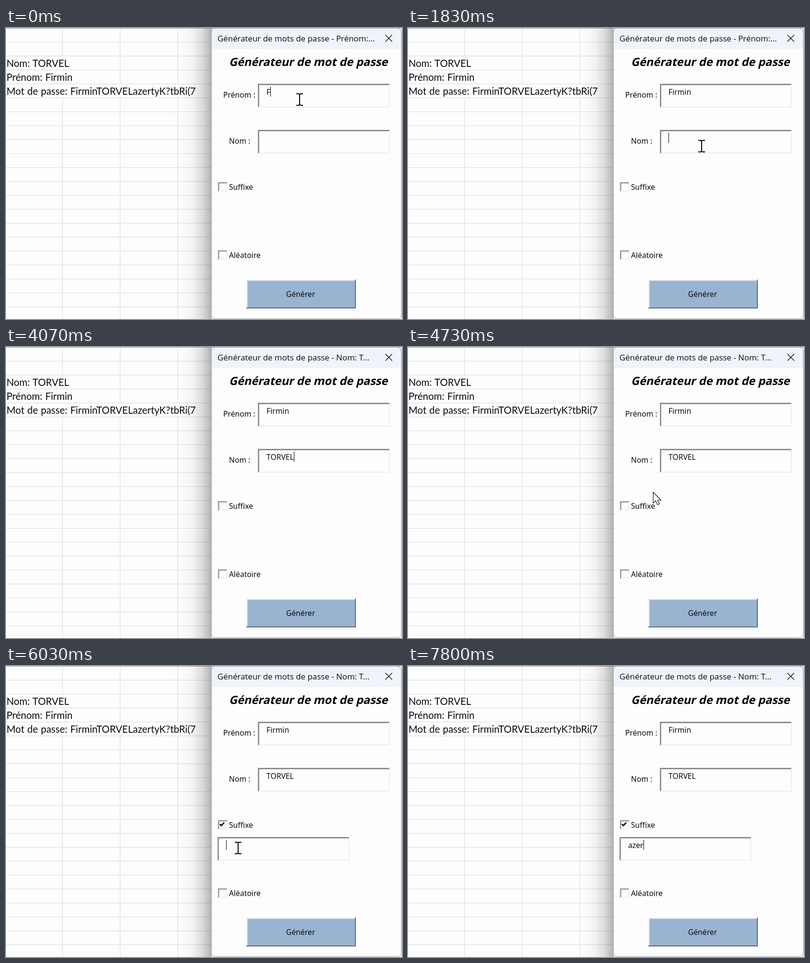
Recreate the animation shown at these times as an HTML page. Size 824x606 px, loop 8000 ms.

```html
<!DOCTYPE html>
<html lang="fr">
<head>
<meta charset="utf-8">
<title>Générateur de mots de passe</title>
<style>
  html, body { margin: 0; width: 100%; height: 100%; overflow: hidden; background: #fdfdfd; }
  svg { display: block; }
  text { fill: #0c0c0c; font: 15.7px "Noto Sans", "Open Sans", sans-serif; white-space: pre; }
  .cell { font: 20.4px Lato, sans-serif; word-spacing: .8px; }
  .caption { font: 16.9px "Open Sans", "Noto Sans", sans-serif; }
  .heading { font: bold 23.45px "Noto Sans", "Open Sans", sans-serif; fill: #000; }
</style>
</head>
<body>
<svg id="stage" width="824" height="606" viewBox="0 0 824 606">
  <defs>
    <linearGradient id="shade">
      <stop offset="0" stop-opacity="0"/>
      <stop offset=".4" stop-opacity=".04"/>
      <stop offset=".7" stop-opacity=".13"/>
      <stop offset="1" stop-opacity=".3"/>
    </linearGradient>
  </defs>
  <g id="sheet"></g>
  <rect x="362" width="66" height="606" fill="url(#shade)"/>
  <rect x="822" width="2" height="606" fill="#d6d6d6"/>
  <rect x="427.5" y=".5" width="395" height="605" rx="9" fill="#fdfdfd"/>
  <path d="M428 44V10Q428 1 437 1H813Q822 1 822 10V44Z" fill="#eef4f9"/>
  <rect x="427.5" y=".5" width="395" height="605" rx="9" fill="none" stroke="#a4a4a4"/>
  <path d="M789.5 14.5l14 14m0-14l-14 14" stroke="#1c1c1c" stroke-width="1.5"/>
  <g id="form"></g>
  <g id="suffix"></g>
  <rect id="caret" width="1" height="21"/>
  <g id="beam">
    <path d="M-7-12H-2L0-10.5 2-12H7M0-11V11M-7 12H-2L0 10.5 2 12H7" fill="none" stroke="#000" stroke-width="2"/>
  </g>
  <path id="arrow" d="M0 0V22.5L5 18 9 26 12.8 24.3 9.2 16.5H16Z" fill="#fff" stroke="#111" stroke-width="1.2"/>
</svg>
<script>
const LOOP = 8000, BLINK = 530;
const FIRST = "Firmin", LAST = "TORVEL";
const $ = id => document.getElementById(id);

function add(parent, tag, attrs, content = "") {
  const node = document.createElementNS("http://www.w3.org/2000/svg", tag);
  for (const key in attrs) node.setAttribute(key, attrs[key]);
  node.textContent = content;
  return parent.appendChild(node);
}
const label = (parent, x, y, content, cls = "") =>
  add(parent, "text", { x, y, class: cls }, content);
const line = (parent, d, stroke, width = 1) =>
  add(parent, "path", { d, stroke, "stroke-width": width, fill: "none" });

function sunken(parent, x, y, w, h, inset) {
  line(parent, `M${x} ${y + h - .5}H${x + w - .5}V${y}`, "#e0e0e0");
  line(parent, `M${x + .75} ${y + h}V${y + .75}H${x + w}`, "#a0a0a0", 1.5);
  line(parent, `M${x + 2} ${y + h - 1}V${y + 2}H${x + w - 1}`, "#696969", inset);
}

// Spreadsheet
const sheet = $("sheet"), form = $("form"), suffix = $("suffix");
for (let y = 29.5; y < 606; y += 29) line(sheet, `M0 ${y}H824`, "#d9d9d9");
for (let x = 117.5; x < 427; x += 120) line(sheet, `M${x} 0V606`, "#d9d9d9");
line(sheet, "M0 .5H824", "#9c9c9c");
add(sheet, "path", { d: "M110 59h20v28h-20ZM110 88h20v28h-20ZM110 117H400v28H110Z", fill: "#fdfdfd" });
[`Nom: ${LAST}`, `Prénom: ${FIRST}`, `Mot de passe: ${FIRST}${LAST}azertyK?tbRi(7`]
  .forEach((content, i) => label(sheet, 1, 81 + 29 * i, content, "cell"));

// Dialog
const caption = label(form, 440, 28, "", "caption");
label(form, 0, 0, "Générateur de mot de passe", "heading")
  .setAttribute("transform", "translate(464 79) skewX(-13)");
label(form, 452, 145, "Prénom :");
label(form, 464, 241, "Nom :");
label(form, 464, 337, "Suffixe");
label(form, 464, 479, "Aléatoire");
sunken(form, 441, 321, 19, 19, 1);
sunken(form, 441, 463, 19, 19, 1);
add(form, "rect", { x: 501, y: 525, width: 227, height: 59, fill: "#99b4d1" });
line(form, "M502 583V526H727", "#e3e9f0", 1.5);
line(form, "M500 583H727V524", "#646970", 2);
label(form, 613, 560, "Générer").setAttribute("text-anchor", "middle");
line(suffix, "M445 329l3 3.5 6-6.5", "#000", 2.6);

const fields = [
  { x: 524, y: 116, word: FIRST, keys: [0, 170, 330, 500, 670, 830], focus: [0, 1800] },
  { x: 524, y: 212, word: LAST, keys: [2830, 3170, 3360, 3540, 3720, 3900], focus: [1800, 5330] },
  { x: 440, y: 356, word: "azer", keys: [7230, 7400, 7570, 7740], focus: [5970, LOOP] }
];
for (const f of fields) {
  const parent = f === fields[2] ? suffix : form;
  sunken(parent, f.x, f.y, 274, 49, 1.4);
  f.node = label(parent, f.x + 18, f.y + 23, "");
}

// Pointer: time, x, y
const path = [[0, 611, 149], [1300, 611, 149], [1770, 611, 246], [4130, 611, 246],
  [5130, 456, 333], [5480, 456, 333], [5830, 483, 379], [LOOP, 483, 379]];
const shown = [[0, 170], [1300, 2830], [4130, 7230]];
const within = (t, [from, to]) => t >= from && t < to;

function show(node, on) {
  node.style.display = on ? "" : "none";
}

function drawPointer(t, checked) {
  const i = path.findIndex(p => p[0] > t);
  const [t0, x0, y0] = path[i - 1], [t1, x1, y1] = path[i];
  const u = (t - t0) / (t1 - t0), k = u * u * (3 - 2 * u);
  const x = x0 + (x1 - x0) * k, y = y0 + (y1 - y0) * k;
  const visible = shown.some(span => within(t, span));
  const inField = fields.some((f, n) => (n < 2 || checked) &&
    within(x, [f.x, f.x + 274]) && within(y, [f.y, f.y + 49]));
  show($("beam"), visible && inField);
  show($("arrow"), visible && !inField);
  for (const id of ["beam", "arrow"])
    $(id).setAttribute("transform", `translate(${x.toFixed(1)} ${y.toFixed(1)})`);
}

function draw(t) {
  const checked = t >= 5330;
  show(suffix, checked);
  let caretOn = false;
  for (const f of fields) {
    const count = f.keys.filter(k => k <= t).length;
    f.node.textContent = f.word.slice(0, count);
    if (!within(t, f.focus)) continue;
    const since = t - (count ? f.keys[count - 1] : f.focus[0]);
    caretOn = Math.floor(since / BLINK) % 2 === 0;
    const width = count ? f.node.getComputedTextLength() : 0;
    $("caret").setAttribute("x", Math.round(f.x + 18 + width));
    $("caret").setAttribute("y", f.y + 6);
  }
  show($("caret"), caretOn);
  const typed = fields[1].node.textContent;
  caption.textContent = "Générateur de mots de passe - " +
    (typed ? `Nom: ${typed[0]}${typed.length > 1 ? "..." : ""}` : "Prénom:...");
  drawPointer(t, checked);
}

const start = performance.now();
function tick() {
  draw((performance.now() - start) % LOOP);
  requestAnimationFrame(tick);
}
tick();
</script>
</body>
</html>
```
